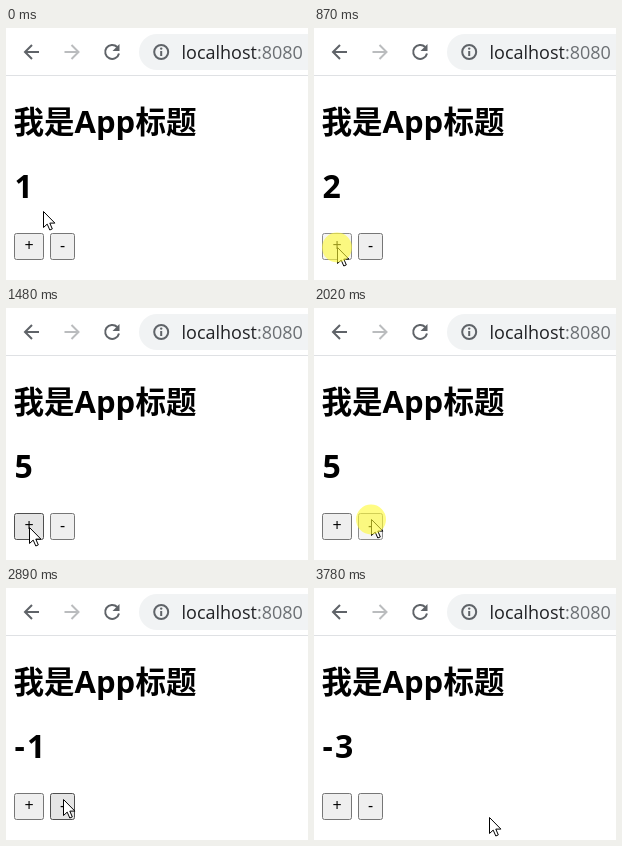
An HTML page with a canvas for the animation above (3980 ms loop, 302x252 px).

```html
<!DOCTYPE html>
<html lang="zh">
<head>
<meta charset="utf-8">
<title>Counter</title>
<style>
  html, body { margin: 0; width: 100%; height: 100%; overflow: hidden; background: #fff; }
  canvas { display: block; }
</style>
</head>
<body>
<canvas id="stage" width="302" height="252"></canvas>
<script>
const ctx = document.getElementById('stage').getContext('2d');
const LOOP = 3980;
const STEPS = 59; // the screen refreshes this often per loop
const LATIN = '"Open Sans", "Noto Sans", sans-serif';
const CJK = '"Noto Sans CJK SC", "Noto Sans CJK", sans-serif';

// Pointer moves along quadratic curves; times in steps
const moves = [
  { start: 0, end: 6, from: [37, 183], bend: [50, 205], to: [23, 219] },
  { start: 23, end: 29, from: [23, 219], bend: [56, 261], to: [57, 211] },
  { start: 53, end: 56, from: [57, 211], bend: [46, 216], to: [175, 229] }
];

// Evenly paced clicks, each held for one step
const burst = (start, pace, count, change) =>
  Array.from({ length: count }, (_, i) => ({ down: Math.round(start + i * pace), change }));
const clicks = [...burst(9, 4, 4, 1), ...burst(30, 2.4, 6, -1), ...burst(46, 5, 2, -1)];

const buttons = [
  { label: '+', x: 8, y: 205, w: 30, h: 27 },
  { label: '-', x: 44, y: 205, w: 25, h: 27 }
];

function pointerAt(step) {
  const { start, end, from, bend, to } = moves.findLast(move => move.start <= step);
  const p = Math.min(1, (step - start) / (end - start));
  const q = 1 - p;
  return [0, 1].map(i => Math.round(q * q * from[i] + 2 * p * q * bend[i] + p * p * to[i]));
}

function text(value, x, y, font, color = '#000', align = 'left') {
  ctx.font = font;
  ctx.fillStyle = color;
  ctx.textAlign = align;
  ctx.fillText(value, x, y);
}

function stroke(path, color, width) {
  ctx.strokeStyle = color;
  ctx.lineWidth = width;
  ctx.stroke(new Path2D(path));
}

function disc(x, y, r, color) {
  ctx.fillStyle = color;
  ctx.beginPath();
  ctx.arc(x, y, r, 0, Math.PI * 2);
  ctx.fill();
}

function drawToolbar() {
  stroke('M33 24H19.5M26 17L19 24L26 31', '#5f6368', 2);
  stroke('M58.5 24H72M65.5 17L72.5 24L65.5 31', '#babcbe', 2);
  stroke('M111.2 19A7 7 0 1 0 113 25.5', '#5f6368', 2);
  ctx.fillStyle = '#5f6368';
  ctx.fill(new Path2D('M113.5 16V23H106.5Z'));

  ctx.fillStyle = '#f1f3f4';
  ctx.beginPath();
  ctx.roundRect(133, 6, 240, 36, 18);
  ctx.fill();
  stroke('M148.2 24a7 7 0 1 0 14 0a7 7 0 1 0 -14 0M155.2 23V28', '#5f6368', 2);
  disc(155.2, 20.6, 1.2, '#5f6368');

  const urlFont = '18px ' + LATIN;
  text('localhost', 175.5, 31, urlFont, '#202124');
  text(':8080', 175.5 + ctx.measureText('localhost').width, 31, urlFont, '#6b6f73');

  ctx.fillStyle = '#dfe1e4';
  ctx.fillRect(0, 47, 302, 1);
}

function drawHeading() {
  const cjkFont = 'bold 30.5px ' + CJK;
  text('我是', 7.5, 105, cjkFont);
  text('App', 68.5, 105, 'bold 31px ' + LATIN);
  text('标题', 129.5, 105, cjkFont);
}

function drawCounter(count) {
  const font = 'bold 32px ' + LATIN;
  if (count < 0) text('-', 8.5, 170, font);
  text(Math.abs(count), count < 0 ? 21 : 8.6, 170, font);
}

function drawButton({ label, x, y, w, h }, hovered, pressed) {
  const [fill, border] = pressed ? ['#f5f5f5', '#8d8d8d']
    : hovered ? ['#e5e5e5', '#4f4f4f'] : ['#efefef', '#767676'];
  ctx.fillStyle = fill;
  ctx.strokeStyle = border;
  ctx.lineWidth = 1;
  ctx.beginPath();
  ctx.roundRect(x + .5, y + .5, w - 1, h - 1, 2);
  ctx.fill();
  ctx.stroke();
  text(label, x + w / 2, y + 18, '16px ' + LATIN, '#000', 'center');
}

function drawPointer(x, y) {
  ctx.save();
  ctx.translate(x + .5, y + .5);
  const arrow = 'M0 0V16L3.7 12.6L6.3 18.5L8.8 17.4L6.3 11.6H11.4Z';
  ctx.fillStyle = '#fff';
  ctx.fill(new Path2D(arrow));
  stroke(arrow, '#000', 1);
  ctx.restore();
}

function draw(step) {
  const [x, y] = pointerAt(step);
  const pressed = clicks.some(click => click.down === step);
  const count = clicks.reduce((sum, { down, change }) => step > down ? sum + change : sum, 1);

  ctx.fillStyle = '#fff';
  ctx.fillRect(0, 0, 302, 252);
  drawToolbar();
  drawHeading();
  drawCounter(count);
  for (const b of buttons) {
    const hovered = x >= b.x && x < b.x + b.w && y >= b.y && y < b.y + b.h;
    drawButton(b, hovered, hovered && pressed);
  }
  drawPointer(x, y);
  if (pressed) disc(x, y + .5, 15, 'rgba(255, 250, 50, .6)');
}

const started = performance.now();
function tick() {
  const time = (performance.now() - started) % LOOP;
  draw(Math.floor(time / LOOP * STEPS + .25));
  requestAnimationFrame(tick);
}
tick();
</script>
</body>
</html>
```
